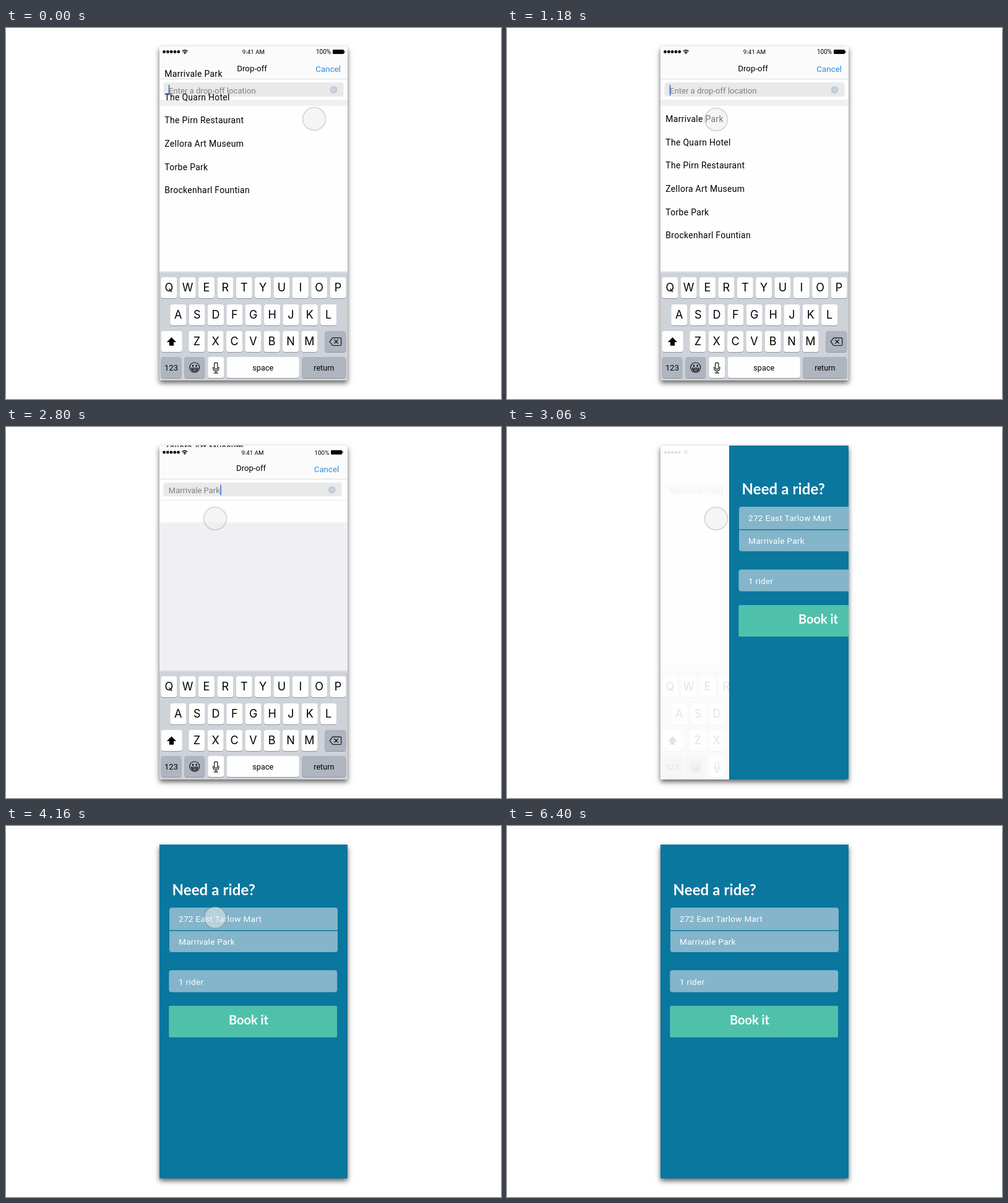
Write an HTML page that moves like this. It is 800 px wide and 600 px high and loops after 6420 ms.

```html
<!DOCTYPE html>
<html lang="en">
<head>
<meta charset="utf-8">
<title>Ride booking</title>
<style>
  html, body { margin: 0; width: 100%; height: 100%; overflow: hidden; background: #fff; }
  #phone {
    position: absolute; left: 248px; top: 30px; width: 304px; height: 540px;
    overflow: hidden; background: #fff; box-shadow: 0 4px 8px rgba(0, 0, 0, .62);
  }
  svg { display: block; }
  text { font-family: Roboto, sans-serif; white-space: pre; }
  .humanist { font-family: Lato, sans-serif; font-size: 14px; letter-spacing: .28px; }
  .key { font-family: Inter, sans-serif; font-size: 18px; }
  .mid { text-anchor: middle; }
</style>
</head>
<body>
<div id="phone">
<svg width="304" height="540" viewBox="248 30 304 540">
  <g id="search">
    <rect x="248" y="30" width="304" height="540" fill="#f0eff4"/>
    <rect id="sheet" x="248" y="126" width="304" height="269" fill="#fefefe"/>
    <g id="header">
      <rect x="248" y="30" width="310" height="87" fill="#fefefe"/>
      <rect x="248" y="30" width="310" height="52" fill="#fbfbfb"/>
      <path d="M248 82.5h310" stroke="#dcdcdc"/>
      <path d="M248 117h310" stroke="#e9e9ec"/>
      <g id="dots"></g>
      <g fill="none" stroke="#000" stroke-width="1.3">
        <path d="M284.8 37.6q4.4-3.8 8.8 0M286.6 39.6q2.6-2.2 5.2 0"/>
        <circle cx="289.2" cy="41" r=".5"/>
      </g>
      <text x="400" y="42.3" font-size="9.8" class="mid">9:41 AM</text>
      <text x="501" y="42.3" font-size="10">100%</text>
      <rect x="528" y="35" width="18" height="7" rx="1.2"/>
      <rect x="546.4" y="37" width="1.2" height="3"/>
      <text x="397.6" y="69.5" font-size="13.3" class="mid">Drop-off</text>
      <text x="500.3" y="71.2" font-size="13.4" fill="#2c8de0">Cancel</text>
      <rect x="254.5" y="88" width="291" height="23" rx="4" fill="#e9e9ea"/>
      <text id="query" x="263" y="105.7" font-size="13.1" fill="#818184"></text>
      <rect id="cursor" y="92" width="1.8" height="17" fill="#4a78dc"/>
      <circle cx="529.5" cy="100" r="6" fill="#c2ccd6"/>
      <path d="M527.5 98l4 4m0-4l-4 4" stroke="#e4e9ee"/>
    </g>
    <g id="names" class="humanist"></g>
    <g id="keyboard">
      <rect x="248" y="394" width="304" height="176" fill="#ced2d9"/>
      <path d="M248 394.5h304" stroke="#dde1ea" stroke-width="2"/>
      <g id="keys"></g>
      <path d="M267.5 500.3l7.6 7.6h-4v5.8h-7.2v-5.8h-4z"/>
      <g fill="none" stroke="#111" stroke-width="1.2">
        <path d="M523 507.3l5-6.2h12.2q1.5 0 1.5 1.5v9.4q0 1.5-1.5 1.5H528zM530.4 504l6.4 6.4m0-6.4l-6.4 6.4"/>
        <circle cx="304.8" cy="549" r="8"/>
        <path d="M299.5 550.2h10.6q-.8 5-5.3 5t-5.3-5zM300.2 552.4h9.2"/>
        <path d="M334.7 548v2q0 4.6 4.6 4.6t4.6-4.6v-2M339.3 554.6v3.2m-3.6 0h7.2"/>
        <rect x="336.7" y="541.2" width="5.2" height="10.6" rx="2.6"/>
      </g>
      <ellipse cx="302" cy="546.3" rx="1.1" ry="1.7"/>
      <ellipse cx="307.6" cy="546.3" rx="1.1" ry="1.7"/>
    </g>
  </g>
  <g id="booking">
    <rect x="248" y="10" width="304" height="580" fill="#0a779f"/>
    <g id="form" fill="#fff">
      <text x="268.5" y="112.3" class="humanist" style="font-size:24px;font-weight:700;letter-spacing:.1px">Need a ride?</text>
      <g fill="#84b5ca">
        <path d="M264 168.5V136q0-4 4-4h264q4 0 4 4v32.500z"/>
        <path d="M264 170v30q0 4 4 4h264q4 0 4-4v-30z"/>
        <rect x="263.400" y="233.300" width="271.800" height="35.400" rx="4"/>
      </g>
      <rect x="263.300" y="290.800" width="271.700" height="51" rx="2" fill="#4fc1ab"/>
      <g class="humanist" style="font-size:13.600px">
        <text x="279" y="155">272 East Tarlow Mart</text>
        <text x="279" y="191.500" id="destination"></text>
        <text x="279" y="256.500">1 rider</text>
      </g>
      <text x="392" y="321.200" class="humanist mid" style="font-size:20px;font-weight:700;letter-spacing:0">Book it</text>
    </g>
  </g>
  <circle id="touch" fill="#ededed" fill-opacity=".5" stroke="#000" stroke-opacity=".13" stroke-width="2"/>
</svg>
</div>
<script>
const LOOP = 6420, SELECT = 2500, PUSH = 2840;
const $ = id => document.getElementById(id);
const places = ["Marrivale Park", "The Quarn Hotel", "The Pirn Restaurant",
  "Zellora Art Museum", "Torbe Park", "Brockenharl Fountian"];

$("names").innerHTML = places.map((name, i) =>
  `<text x="256.3" y="${152 + 37.65 * i}">${name}</text>`).join("");
$("destination").textContent = places[0];
$("dots").innerHTML = [0, 1, 2, 3, 4].map(i =>
  `<circle cx="${255.6 + 5.8 * i}" cy="38.5" r="2.4"/>`).join("");

function key(x, y, width, label = "", dark = false, size = 18) {
  const box = (dy, fill) => `<rect x="${x}" y="${y + dy}" width="${width}" height="34" rx="4" fill="${fill}"/>`;
  const font = size === 18 ? "key mid" : "mid";
  return box(1, "#92969d") + box(0, dark ? "#aeb5bf" : "#fefefe") +
    `<text class="${font}" x="${x + width / 2}" y="${y + 17 + size * .36}" font-size="${size}">${label}</text>`;
}
const row = (letters, x, y) =>
  [...letters].map((letter, i) => key(x + 30.36 * i, y, 26, letter)).join("");

$("keys").innerHTML =
  row("QWERTYUIOP", 250.3, 403) + row("ASDFGHJKL", 265.3, 447) + row("ZXCVBNM", 295.3, 490) +
  key(250.5, 490, 34.3) + key(515.3, 490, 34, "", true) +
  key(250.5, 532, 33, "123", true, 13) + key(288.3, 532, 33, "", true) + key(326.3, 532, 26) +
  key(356.8, 532, 117, "space", false, 12.7) + key(478.3, 532, 71, "return", true, 12.6);

// Cubic Bezier (.25, .1, .25, 1), solved by bisection
function ease(x) {
  if (x <= 0) return 0;
  if (x >= 1) return 1;
  const curve = (a, b, u) => 3 * a * u * (1 - u) ** 2 + 3 * b * u * u * (1 - u) + u ** 3;
  let low = 0, high = 1;
  for (let i = 0; i < 24; i++) {
    const u = (low + high) / 2;
    if (curve(.25, .25, u) < x) low = u; else high = u;
  }
  return curve(.1, 1, low);
}
const progress = (t, start, duration) => ease((t - start) / duration);
const move = (id, x, y) => $(id).setAttribute("transform", `translate(${x} ${y})`);

function setQuery(selected) {
  const text = selected ? places[0] : "Enter a drop-off location";
  if ($("query").textContent === text) return;
  $("query").textContent = text;
  $("cursor").setAttribute("x", selected ? 263.5 + $("query").getComputedTextLength() : 262.6);
  // Names pass over the header on the way in and behind it on the way out
  $("search").insertBefore($("names"), $(selected ? "header" : "keyboard"));
}

function draw(t) {
  const selected = t >= 2520;
  setQuery(selected);

  const leave = progress(t, SELECT, 440);
  const enter = progress(t, -182, 400);
  move("names", 0, selected ? -243 * leave : -300 * (1 - enter));
  move("sheet", 0, -258 * leave);
  const sx = 1 - .0107 * leave, sy = 1 - .017 * leave;
  $("header").setAttribute("transform",
    `matrix(${sx} 0 0 ${sy} ${248 * (1 - sx)} ${195 * (1 - sy)})`);

  const push = progress(t, PUSH, 600);
  $("search").setAttribute("opacity", 1 - progress(t, PUSH, 360));
  move("booking", 304 * (1 - push), 0);
  move("form", 0, -8 * (1 - push));

  const pressed = (t >= 2300 && t < 2520) || t >= 3180;
  const touch = $("touch");
  touch.setAttribute("cx", 498 - 160 * progress(t, 640, 560) + 262 * progress(t, 4300, 240));
  touch.setAttribute("cy", 147 + progress(t, 640, 560));
  touch.setAttribute("r", pressed ? 17.5 : 18.5);
}

function tick() {
  draw(performance.now() % LOOP);
  requestAnimationFrame(tick);
}
tick();
</script>
</body>
</html>
```
